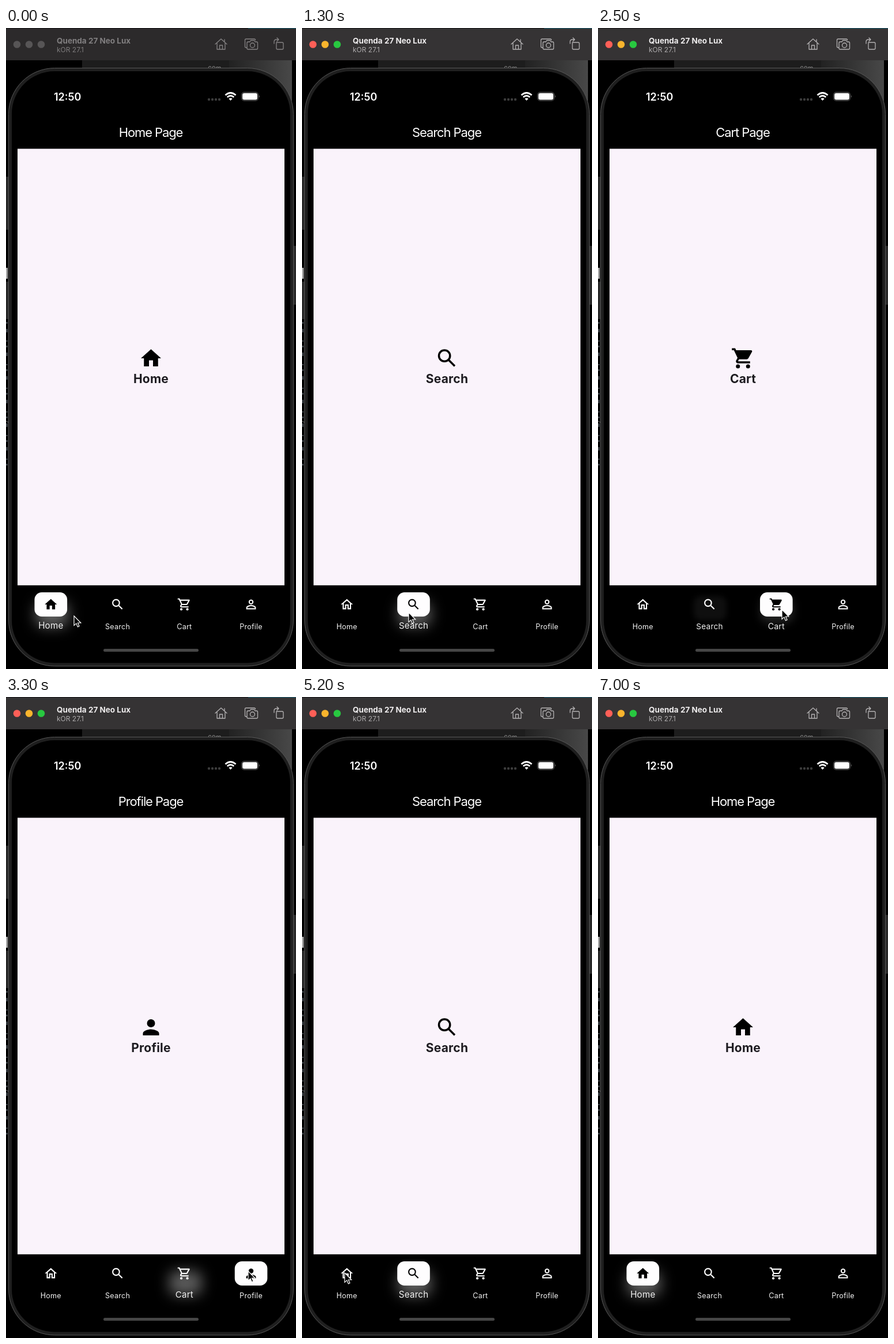
Write an HTML page that moves like this. It is 503 px wide and 1112 px high and loops after 7.1 s.

```html
<!DOCTYPE html>
<html lang="en">
<head>
<meta charset="utf-8">
<title>Tab bar</title>
<style>
  html, body { margin: 0; width: 100%; height: 100%; overflow: hidden; background: #000; }
  svg { display: block; width: 503px; height: 1112px; font-family: Inter, Roboto, sans-serif; }
  .mid { text-anchor: middle; }
  .line { fill: none; stroke-width: 1.3; stroke-linejoin: round; stroke-linecap: round; }
  #title { font-size: 22px; font-weight: 400; letter-spacing: -1.1px; fill: #fff; }
  #name { font-size: 21px; font-weight: 700; letter-spacing: .2px; fill: #1d1b20; }
  .tab text { letter-spacing: .2px; fill: #f2f2f2; }
</style>
</head>
<body>
<svg viewBox="0 0 503 1112">
  <defs>
    <linearGradient id="shade"><stop stop-color="#222"/><stop offset="1" stop-color="#484848"/></linearGradient>
    <g id="homeOn"><path d="M10 20v-6h4v6h5v-8h3L12 3 2 12h3v8z"/></g>
    <g id="homeOff"><path d="M12 5.7l5 4.5V18h-2v-6H9v6H7v-7.8zM12 3L2 12h3v8h6v-6h2v6h6v-8h3z" fill-rule="evenodd"/></g>
    <g id="searchOn" fill="none" stroke="currentColor" stroke-width="2">
      <circle cx="9.5" cy="9.5" r="5.5"/><path d="M13.7 13.7l6 6"/>
    </g>
    <g id="searchOff"><use href="#searchOn"/></g>
    <g id="wheels"><circle cx="7" cy="20" r="2"/><circle cx="17" cy="20" r="2"/></g>
    <g id="cartOn">
      <path d="M1 2v2h2l3.6 7.6-1.35 2.4C4.5 15.4 5.5 17 7 17h12v-2H7.4q-.3-.1-.2-.4l.9-1.6h7.45q1.2 0 1.75-1l3.6-6.5Q21.4 4.3 20 4H5.2l-.95-2z"/>
      <use href="#wheels"/>
    </g>
    <g id="cartOff">
      <path d="M15.55 13q1.2 0 1.75-1l3.58-6.5Q21.4 4.3 20 4H5.2l-.95-2H1v2h2l3.6 7.6-1.35 2.4C4.5 15.4 5.5 17 7 17h12v-2H7l1.1-2zM6.2 6h12.1l-2.75 5H8.5z" fill-rule="evenodd"/>
      <use href="#wheels"/>
    </g>
    <g id="profileOn"><circle cx="12" cy="8" r="4"/><path d="M12 14c-2.67 0-8 1.34-8 4v2h16v-2c0-2.66-5.33-4-8-4z"/></g>
    <g id="profileOff" fill="none" stroke="currentColor" stroke-width="1.9">
      <circle cx="12" cy="8" r="3.05"/><path d="M12 13.95c-2.8 0-7.05 1.4-7.05 3.05v2.05h14.1V17c0-1.65-4.25-3.05-7.05-3.05z"/>
    </g>
  </defs>

  <!-- desktop behind the device -->
  <rect width="503" height="1112"/>
  <path d="M132 56h255v40H132z" fill="#1d1d1d"/>
  <path d="M387 56h109v70H387z" fill="url(#shade)"/>
  <text x="350" y="74" font-size="11" fill="#888">60m</text>
  <path d="M0 258h4v92H0zM0 440h4v65H0zM499 378h4v102h-4z" fill="#292929"/>
  <path d="M0 416h3v19H0z" fill="#aaa"/>
  <path d="M1.5 510V760" stroke="#3a3f44" stroke-width="3" stroke-dasharray="3 9 6 14 2 7"/>
  <path d="M0 682l6 3" stroke="#777"/>

  <!-- window bar -->
  <rect id="bar" width="503" height="56"/>
  <path d="M0 .5H503" stroke="#151515"/>
  <path d="M420 .5h83" stroke="#17566a"/>
  <g id="lights"><circle cx="19" cy="28.5" r="6.3"/><circle cx="40" cy="28.5" r="6.3"/><circle cx="61" cy="28.5" r="6.3"/></g>
  <text id="device" x="88" y="26.5" font-size="13.5" font-weight="700">Quenda 27 Neo Lux</text>
  <text id="system" x="88" y="41.5" font-size="12">kOR 27.1</text>
  <g id="tools" class="line">
    <path d="M363 28l10-9 10 9M366 26v11h14V26M370.500 37v-7h5v7M379 24v-4"/>
    <path d="M418 34h-1.500q-2 0-2-2V21q0-2 2-2h14q2 0 2 2M420 24h3l1.500-2.500h6L432 24h2.500q2 0 2 2v9q0 2-2 2H420q-2 0-2-2v-9q0-2 2-2z"/>
    <circle cx="427.5" cy="30" r="4"/>
    <path d="M469 25h10q2 0 2 2v8q0 2-2 2h-8q-2 0-2-2zM465 27v-3q0-4 4-4h4M470 17l3 3-3 3"/>
  </g>

  <!-- device body -->
  <rect x="4.5" y="69.5" width="494" height="1037.500" rx="80" fill="#1f1f1f" stroke="#585858"/>
  <rect x="10" y="75" width="483" height="1026.500" rx="74"/>
  <rect x="20" y="209.5" width="463" height="757.300" fill="#faf3fb"/>

  <text x="83" y="125.700" font-size="18" font-weight="600" fill="#fff">12:50</text>
  <path d="M352 124h19" stroke="#3c3c3c" stroke-width="4.400" stroke-linecap="round" stroke-dasharray="0 6"/>
  <path d="M380.500 116.500q9-8 18 0M383.700 120q5.800-5 11.600 0" fill="none" stroke="#fff" stroke-width="2.700"/>
  <path d="M386.400 122.800q3.100-2.400 6.200 0l-3.100 3.200z" fill="#fff"/>
  <rect x="408.500" y="111.500" width="29" height="14.500" rx="4.500" fill="none" stroke="#6a6a6a"/>
  <rect x="410" y="113" width="26" height="11.500" rx="3.200" fill="#fff"/>
  <path d="M439 116.500q2 2.200 0 4.500z" fill="#6a6a6a"/>

  <text id="title" class="mid" x="251" y="188.500"></text>
  <use id="hero" transform="translate(230.500 552) scale(1.750)" color="#000"/>
  <text id="name" class="mid" x="251.500" y="616"></text>
  <g id="tabs"></g>
  <rect x="169" y="1077" width="165" height="5" rx="2.500" fill="#464646"/>
  <path id="cursor" d="M0 0V16.500L3.900 12.900 6.400 18.900 9 17.800 6.500 12H11.800Z" stroke="#fff" stroke-width="1.200"/>
</svg>
<script>
const LOOP = 7100, STEP = 100, FADE = 300, ACTIVE_AT = 900;
const names = ['Home', 'Search', 'Cart', 'Profile'];
// [time, tab]
const taps = [[-FADE, 0], [1010, 1], [2320, 2], [3290, 3], [4090, 1], [5240, 0]];
// [time, x, y] of the pointer tip
const path = [
  [0, 118, 1020], [600, 176, 1017], [700, 176, 1017], [1000, 185, 1014], [1600, 185, 1014],
  [2300, 319, 1009], [2700, 319, 1009], [3200, 420, 996], [3500, 420, 996],
  [4000, 182, 1001], [4700, 182, 1001], [5100, 74, 999], [5600, 74, 999], [6000, -20, 985]
];

const $ = id => document.getElementById(id);
const clamp = v => Math.min(1, Math.max(0, v));
const mix = (a, b, p) => a + (b - a) * p;
const icon = (i, on) => '#' + names[i].toLowerCase() + (on ? 'On' : 'Off');

$('tabs').innerHTML = names.map((name, i) => {
  const box = 'x="-28.3" y="-21" width="56.6" height="42" rx="12.5"';
  return `<g class="tab" transform="translate(${77.8 + 115.75 * i} 1000)">
    <rect class="glow" ${box}/>
    <rect class="pill" ${box} fill="#fefdfe"/>
    <use transform="translate(-12.6 -12.6) scale(1.05)"/>
    <text class="mid">${name}</text></g>`;
}).join('');
const tabs = [...document.querySelectorAll('.tab')].map(g => ({
  glow: g.querySelector('.glow'), pill: g.querySelector('.pill'),
  icon: g.querySelector('use'), label: g.querySelector('text')
}));

function drawTab(tab, i, on, k) {
  const c = 255 * k;
  tab.glow.setAttribute('fill', `rgba(${c},${c},${c},${0.38 * k})`);
  tab.glow.style.transform = `translate(${2 * k}px,${17 * k}px)`;
  tab.glow.style.filter = k ? `blur(${12 * k}px)` : 'none';
  tab.pill.setAttribute('visibility', on ? 'visible' : 'hidden');
  tab.icon.setAttribute('href', icon(i, on));
  const ink = on ? '#000' : '#fff';
  tab.icon.setAttribute('fill', ink);
  tab.icon.setAttribute('color', ink);
  tab.label.setAttribute('font-size', mix(12.6, 15.2, k));
  tab.label.setAttribute('y', mix(43, 42.2, k));
}

function drawBar(active) {
  const pick = (a, b) => active ? a : b;
  $('bar').setAttribute('fill', pick('#353334', '#2c2a2b'));
  $('device').setAttribute('fill', pick('#efedee', '#817f80'));
  $('system').setAttribute('fill', pick('#aeacad', '#7d7b7c'));
  $('tools').setAttribute('stroke', pick('#b4b2b3', '#858384'));
  ['#ff5f57', '#f9b42d', '#28c840'].forEach((c, i) =>
    $('lights').children[i].setAttribute('fill', pick(c, '#575556')));
}

function drawCursor(t) {
  let n = path.findIndex(p => p[0] > t);
  if (n < 0) n = path.length - 1;
  const [a, b] = [path[n - 1], path[n]];
  const p = clamp((t - a[0]) / (b[0] - a[0])), e = p * p * (3 - 2 * p);
  $('cursor').setAttribute('transform', `translate(${mix(a[1], b[1], e)} ${mix(a[2], b[2], e)})`);
}

function draw(t) {
  const n = taps.filter(tap => tap[0] <= t).length - 1;
  const [since, now] = taps[n], last = n ? taps[n - 1][1] : -1;
  const p = clamp((t - since) / FADE);
  tabs.forEach((tab, i) => drawTab(tab, i, i === now, i === now ? p : i === last ? 1 - p : 0));
  $('title').textContent = names[now] + ' Page';
  $('name').textContent = names[now];
  $('hero').setAttribute('href', icon(now, true));
  drawBar(t >= ACTIVE_AT);
  drawCursor(t);
}

function frame() {
  draw(Math.floor(performance.now() % LOOP / STEP) * STEP);
  requestAnimationFrame(frame);
}
frame();
</script>
</body>
</html>
```
